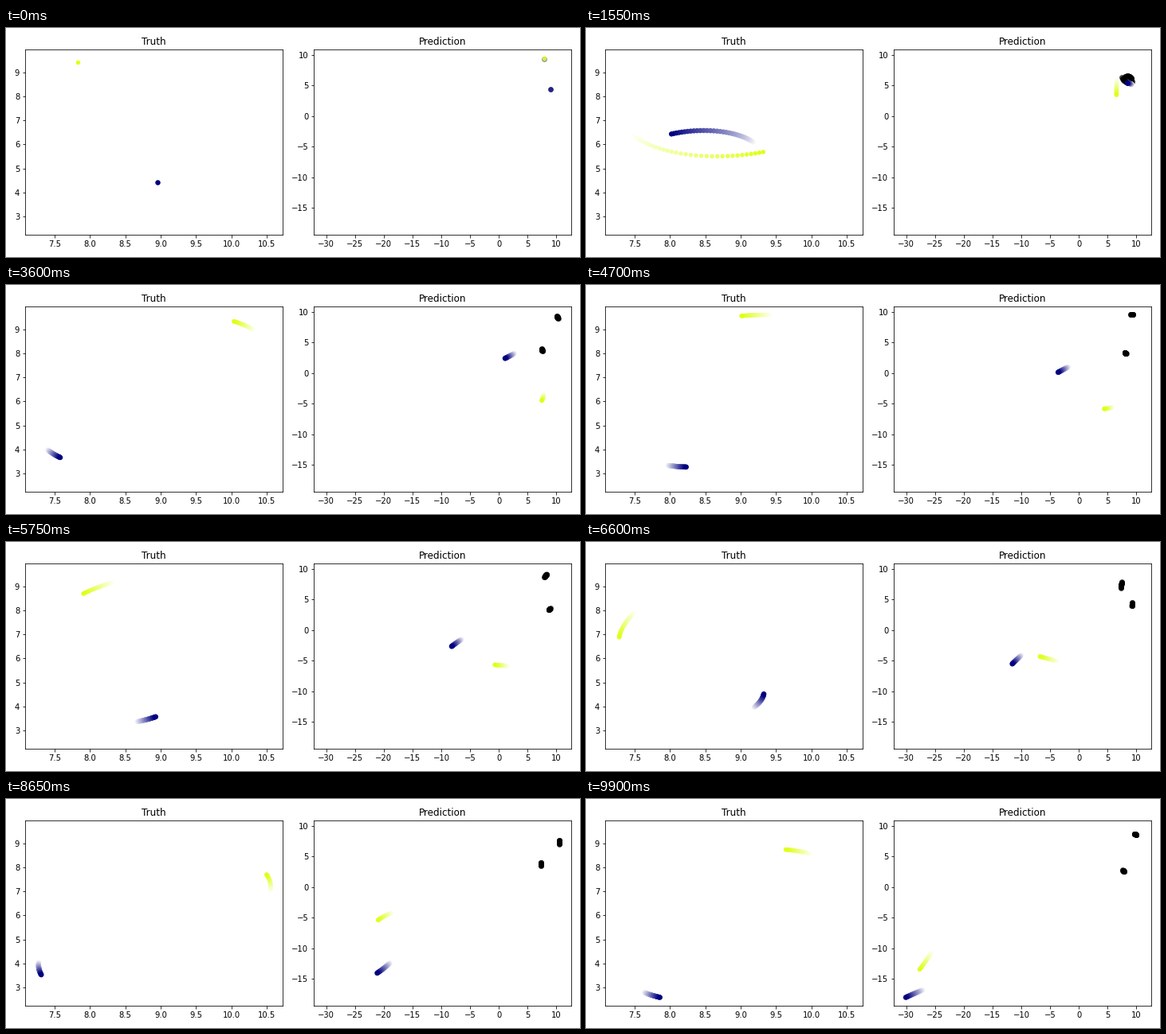
Animation of 720x288 px, one loop 9.95 s. Source, as a matplotlib script:

```python
import numpy as np
import matplotlib.pyplot as plt
from matplotlib.animation import FuncAnimation

FRAMES, INTERVAL = 199, 50
SUB = 4            # trail dots per frame
TRAIL = 33         # dots in a full trail

# Heavy body first, light body second
COLORS = np.array([(0, 0, 0.5), (0.875, 1, 0.09)])
SIZES = (42, 30)
SHADOW = (0, 0, 0, 0.3)

# Relative Kepler orbit of the true pair
ECC, SEMI, TILT = 0.7186, 3.739, np.radians(256.8)
MEAN0, RATE = -1.4865, 0.05401
LIGHT_SHARE = 0.3865

# Key points of the predicted drift
KEY_FRAMES = np.array([0, 20, 31, 72, 115, 147, 173, 198])
HEAVY_KEYS = [(8.96, 4.43), (9.42, 5.1), (8.42, 5.41), (1.08, 2.41),
              (-8.2, -2.67), (-14.7, -8.41), (-21.15, -14.08), (-30.08, -18.06)]
LIGHT_KEYS = [(7.82, 9.43), (6.65, 6.7), (6.55, 3.45), (7.45, -4.5),
              (-0.72, -5.67), (-12.49, -3.46), (-21.0, -5.41), (-27.66, -13.49)]


def true_paths(t):
    """Both bodies on a Kepler orbit around a drifting centre of mass."""
    mean = MEAN0 + RATE * t
    anomaly = mean + ECC * np.sin(mean)
    for _ in range(30):
        anomaly -= ((anomaly - ECC * np.sin(anomaly) - mean)
                    / (1 - ECC * np.cos(anomaly)))
    along = SEMI * (np.cos(anomaly) - ECC)
    across = SEMI * np.sqrt(1 - ECC ** 2) * np.sin(anomaly)
    c, s = np.cos(TILT), np.sin(TILT)
    rel = np.column_stack([along * c - across * s, along * s + across * c])
    center = np.column_stack([8.518 + 0.00014 * t, 6.36 - 0.00705 * t])
    return center - LIGHT_SHARE * rel, center + (1 - LIGHT_SHARE) * rel


def smooth_path(keys, t):
    """Cubic Hermite curve through the key points."""
    p = np.array(keys)
    slope = np.gradient(p, KEY_FRAMES, axis=0)
    i = np.clip(np.searchsorted(KEY_FRAMES, t, side="right") - 1, 0, len(p) - 2)
    h = (KEY_FRAMES[i + 1] - KEY_FRAMES[i])[:, None]
    u = (t - KEY_FRAMES[i])[:, None] / h
    return ((1 + 2 * u) * (1 - u) ** 2 * p[i] + u * (1 - u) ** 2 * h * slope[i]
            + u ** 2 * (3 - 2 * u) * p[i + 1] + u ** 2 * (u - 1) * h * slope[i + 1])


times = np.arange((FRAMES - 1) * SUB + 1) / SUB
truth = true_paths(times)
guess = [smooth_path(keys, times) for keys in (HEAVY_KEYS, LIGHT_KEYS)]

fig, (ax_true, ax_pred) = plt.subplots(1, 2, figsize=(10, 4), dpi=72)
ax_true.set(title="Truth", xlim=(7.0845, 10.7275), ylim=(2.232, 9.955))
ax_pred.set(title="Prediction", xlim=(-32.13, 12.61), ylim=(-19.44, 10.94))
fig.tight_layout()

shadows = [(ax_pred.scatter([], [], s=36, color=[SHADOW], linewidths=1, zorder=2), path)
           for path in truth]


def fading_trails(ax, paths, alpha):
    return [(ax.scatter([], [], s=size, linewidths=0, zorder=3), path, color, alpha)
            for path, color, size in zip(paths, COLORS, SIZES)]


trails = fading_trails(ax_true, truth, 1) + fading_trails(ax_pred, guess, 0.8)


def update(k):
    head = k * SUB
    span = slice(max(0, head - TRAIL + 1), head + 1)
    age = head - np.arange(span.start, span.stop)
    fade = (age / TRAIL)[:, None]
    for dots, path in shadows:
        dots.set_offsets(path[span])
    for dots, path, color, alpha in trails:
        tint = color * (1 - fade) + fade      # older dots turn white
        dots.set_offsets(path[span])
        dots.set_facecolors(np.column_stack([tint, np.full(len(age), alpha)]))
    return [item[0] for item in shadows + trails]


anim = FuncAnimation(fig, update, frames=FRAMES, interval=INTERVAL,
                     repeat=True, repeat_delay=0)
plt.show()
```
